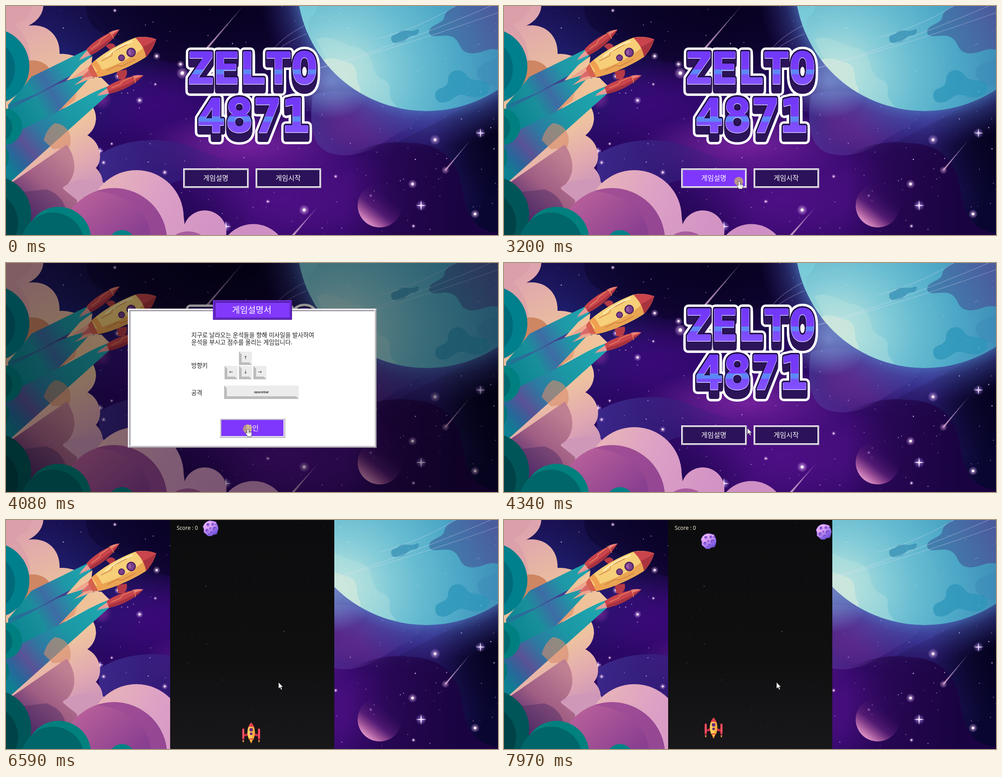
These frames come from a looping animation (1094x512 px, 8000 ms). An HTML page:

```html
<!DOCTYPE html>
<html lang="ko">
<head>
<meta charset="utf-8">
<title>ZELTO 4871</title>
<style>
html, body { margin: 0; width: 100%; height: 100%; overflow: hidden; background: #14043a; }
svg { display: block; width: 100vw; height: 100vh; }
.ko { font-family: 'Noto Sans CJK KR', 'Noto Sans CJK', sans-serif; }
.logo { font-family: 'DejaVu Sans Mono', monospace; font-weight: 700; text-anchor: middle; stroke-linejoin: round; }
.mid { text-anchor: middle; }
</style>
</head>
<body>
<svg id="stage" viewBox="0 0 1094 512" preserveAspectRatio="none"></svg>
<script>
const LOOP = 8000;
let defs = '', ids = 0, seed = 11;
const rnd = () => (seed = (seed * 16807) % 2147483647) / 2147483647;

const rect = (x, y, w, h, fill, more = '') => `<rect x="${x}" y="${y}" width="${w}" height="${h}" fill="${fill}" ${more}/>`;
const circle = (x, y, r, fill, more = '') => `<circle cx="${x}" cy="${y}" r="${r}" fill="${fill}" ${more}/>`;
const path = (d, fill, more = '') => `<path d="${d}" fill="${fill}" ${more}/>`;
const label = (x, y, size, text, fill, cls = 'ko mid', more = '') =>
  `<text x="${x}" y="${y}" font-size="${size}" fill="${fill}" class="${cls}" ${more}>${text}</text>`;
const group = (inner, more = '') => `<g ${more}>${inner}</g>`;

// stops: "offset colour opacity" separated by commas
const stops = list => list.split(',').map(s => {
  const [o, c, a = 1] = s.trim().split(' ');
  return `<stop offset="${o}" stop-color="${c}" stop-opacity="${a}"/>`;
}).join('');
function linear(x1, y1, x2, y2, list) {
  const id = 'g' + ids++;
  defs += `<linearGradient id="${id}" gradientUnits="userSpaceOnUse" x1="${x1}" y1="${y1}" x2="${x2}" y2="${y2}">${stops(list)}</linearGradient>`;
  return `url(#${id})`;
}
function radial(x, y, r, list) {
  const id = 'g' + ids++;
  defs += `<radialGradient id="${id}" gradientUnits="userSpaceOnUse" cx="${x}" cy="${y}" r="${r}">${stops(list)}</radialGradient>`;
  return `url(#${id})`;
}
function glow(x, y, rx, ry, color, alpha) {
  const id = 'g' + ids++;
  defs += `<radialGradient id="${id}">${stops(`0 ${color} ${alpha}, .5 ${color} ${alpha * .6}, 1 ${color} 0`)}</radialGradient>`;
  return `<ellipse cx="${x}" cy="${y}" rx="${rx}" ry="${ry}" fill="url(#${id})"/>`;
}

function star(x, y, r) {
  return glow(x, y, r * 1.7, r * 1.7, '#d9a8ee', .75) + circle(x, y, r * .5, '#fff3f6');
}
function sparkle(x, y, r) {
  const k = r * .13;
  return glow(x, y, r, r, '#b48cf0', .7) +
    path(`M${x} ${y - r}L${x + k} ${y - k} ${x + r} ${y} ${x + k} ${y + k} ${x} ${y + r} ${x - k} ${y + k} ${x - r} ${y} ${x - k} ${y - k}Z`, '#f4e4ff');
}
function comet(x1, y1, x2, y2, w) {
  const a = Math.atan2(y2 - y1, x2 - x1), dx = Math.sin(a) * w, dy = Math.cos(a) * w;
  return path(`M${x1} ${y1}L${x2 + dx} ${y2 - dy}L${x2 - dx} ${y2 + dy}Z`,
    linear(x1, y1, x2, y2, '0 #b98fd0 .4, 1 #d8aed0 .85'));
}
function dust(n, x0, y0, w, h, color, alpha, size) {
  let s = '';
  for (let i = 0; i < n; i++)
    s += circle((x0 + rnd() * w).toFixed(1), (y0 + rnd() * h).toFixed(1), (.5 + rnd() * size).toFixed(2), color,
      `opacity="${(alpha * (.4 + .6 * rnd())).toFixed(2)}"`);
  return s;
}

function sky() {
  return rect(0, 0, 1094, 512, linear(0, 0, 0, 512, '0 #190a48, .45 #2a0864, 1 #2a0760')) +
    glow(130, 130, 230, 190, '#1d2270', .9) +
    glow(480, 10, 400, 190, '#06011c', .9) +
    path('M178 0C182 70 235 60 290 95S400 140 470 115S640 130 668 0Z', '#080222', 'opacity=".35"') +
    glow(330, 220, 170, 100, '#440a86', .6) +
    glow(540, 315, 240, 85, '#8f2bb0', .75) +
    glow(620, 430, 270, 140, '#5a1191', .8) +
    glow(760, 400, 200, 130, '#4a0f80', .55) +
    glow(400, 480, 160, 90, '#1d064c', .6) +
    path('M205 335C250 300 330 292 390 308C450 325 470 350 560 352C500 400 420 370 360 400L210 400Z',
      linear(200, 320, 540, 370, '0 #3c2a8c .95, .5 #37207f .7, 1 #3c1a80 0')) +
    path('M682 200C720 180 830 190 930 240L900 270C850 290 810 340 740 333C690 328 670 290 682 200Z',
      linear(690, 200, 860, 320, '0 #4a3a98 .75, 1 #5a2c90 .5')) +
    glow(800, 250, 110, 80, '#8a2a90', .65) +
    glow(935, 260, 220, 90, '#3a3a96', .7) +
    path('M1094 180V512C1040 500 1024 470 1015 410C1005 340 960 300 870 306C930 270 1010 240 1094 180Z',
      linear(930, 290, 1094, 330, '0 #271762 .7, .5 #17124e .9, 1 #090631 1')) +
    glow(1080, 280, 130, 160, '#03011a', .85) +
    path('M740 352C790 310 850 300 900 306C965 308 1004 340 1015 410C1024 470 1040 500 1094 508V512H740Z',
      linear(760, 420, 1010, 430, '0 #280750 0, .4 #24064c .8, 1 #190441 1')) +
    glow(212, 208, 24, 24, '#7a2a96', .8) +
    dust(230, 120, 0, 974, 512, '#e4c6f2', .9, .95) +
    [[297, 211, 5], [954, 299, 7], [904, 398, 6], [663, 456, 7], [1043, 465, 6], [335, 112, 5], [249, 157, 5],
     [353, 372, 4], [388, 130, 5], [242, 10, 3], [733, 381, 3], [217, 350, 3.5], [235, 308, 2.5], [582, 437, 3],
     [906, 492, 3], [811, 424, 2.5], [332, 175, 2.5], [392, 150, 8]].map(s => star(...s)).join('') +
    comet(529, -2, 444, 98, 2.4) + comet(1035, 297, 977, 367, 1.8) + glow(977, 367, 9, 9, '#e0a8e0', .6) +
    comet(695, 447, 637, 514, 2.4) +
    sparkle(1055, 284, 11) + sparkle(923, 446, 12) + sparkle(489, 493, 12) + sparkle(209, 324, 8);
}

function planets() {
  defs += '<clipPath id="disc"><circle cx="935" cy="-53" r="288"/></clipPath>';
  const surface = circle(935, -53, 288, radial(742, 152, 400,
      '0 #bfe4dd, .12 #a6dbdc, .28 #82cbd8, .45 #66bbd0, .65 #4ea9c8, .85 #4194bb, 1 #3f7fae')) +
    path('M650 0H692C690 25 670 20 672 45C674 75 660 70 650 60Z', '#7fd0dc', 'opacity=".65"') +
    path('M700 145C690 112 730 112 752 125C790 128 775 165 785 178C800 205 760 210 730 190Z', '#dfecdd', 'opacity=".7"') +
    path('M690 75C720 60 745 85 775 92C830 100 800 150 840 165C870 180 835 195 870 225L760 210Z', '#b9e2dd', 'opacity=".35"') +
    path('M857 76C853 62 870 66 874 58C882 50 900 60 912 53C922 48 920 66 906 66C892 66 892 80 878 81C868 84 858 84 857 76Z', '#368db4', 'opacity=".7"') +
    path('M941 60C938 40 975 42 975 22C982 2 1010 -6 1040 -2H1094V98C1070 92 1062 106 1035 106C1003 103 1015 78 990 68C970 62 945 75 941 60Z',
      linear(950, 70, 1080, 10, '0 #3d78a8 .85, .5 #456aa4 .9, 1 #4b5a9c .95')) +
    path('M955 203C950 178 985 190 983 163C986 140 1014 136 1026 158C1040 172 1072 160 1075 180C1076 205 1045 208 1022 200C1000 192 994 215 972 216C962 216 956 212 955 203Z', '#2c96ba', 'opacity=".75"') +
    path('M1050 140C1060 120 1094 126 1094 110V180C1070 180 1040 160 1050 140Z', '#3a86b4', 'opacity=".4"') +
    dust(70, 660, 0, 434, 220, '#d9f2f4', .5, .7);
  const trail = d => path(d, 'none', 'stroke="#e6dcf4" stroke-width="1.1" opacity=".4"');
  return circle(935, -53, 372, radial(935, -53, 372, '.76 #4f7cc6 .75, .84 #4454ac .45, 1 #3a2a90 0')) +
    glow(722, 168, 95, 85, '#7c92d2', .85) +
    group(surface, 'clip-path="url(#disc)"') +
    trail('M640 155Q860 95 1082 -2') + trail('M700 138Q890 88 1094 15') + trail('M664 44Q620 66 596 95') +
    trail('M668 62Q625 80 602 100') + trail('M830 72Q920 48 1000 0') +
    circle(831, 446, 49, linear(803, 484, 850, 425, '0 #d78cc2, .2 #a0549a, .48 #5a1f78 .8, 1 #3a0f63 .1'));
}

function beams() {
  const teal = linear(230, 110, 10, 240, '0 #20aab2, .4 #1e98a6, .6 #3d6ca4, .75 #1a8f9c, 1 #0a8590');
  const peach = linear(120, 230, 210, 150, '0 #e39a70, .4 #efc097, 1 #f0c69e');
  return path('M160 118L60 158 5 221 0 300 120 236 200 165Z', linear(180, 130, 20, 260, '0 #2c5a9e, .35 #433f8c, .6 #3a5c9c, 1 #157e92')) +
    path('M187 94L57 158 5 221 72 195 168 142 192 108Z', teal) +
    path('M182 150L112 176 0 236V302L36 276 120 234 196 164Z', teal) +
    path('M230 176L185 198 120 234 36 276 0 308V402L236 190Z',
      linear(232, 180, 10, 370, '0 #20aab2, .4 1b97a4, .4 #1b97a4, .62 #2c7aa2, .78 #5a5296, .9 #27679a, 1 #0f7f92'.replace('.4 1b97a4, ', ''))) +
    path('M134 167L165 132 192 112 188 150Z', peach) +
    path('M117 235L150 200 185 162 212 160 230 178 165 204Z', peach) +
    path('M117 235L158 192 152 212Z', '#e2916a', 'opacity=".6"');
}

function rocket() {
  const pod = (x, y, a) => group(
    path('M-43 -5L-68 0-43 6Z', '#f2a08c') + path('M-43 -2L-72 2-42 8Z', '#e89a9c', 'opacity=".85"') +
    path('M-43 -8C-20 -13 15 -12 43 0C15 12 -20 13 -43 8Z', '#c9444c') +
    path('M-43 2C-15 5 15 5 43 0C15 12 -20 13 -43 8Z', '#a6323f') +
    path('M-34 -2H-12L-6 -6H18M20 -9Q24 0 20 9', 'none', 'stroke="#f0a06a" stroke-width="1.2"') +
    path('M22 -8C30 -7 38 -3 43 0C36 0 28 -1 23 -1Z', '#e98276'),
    `transform="translate(${x} ${y}) rotate(${a})"`);
  const body = path('M-74 -14L-126 -8-84 1-126 9-70 14Z', '#f0a48e') + path('M-76 -8L-108 2-74 10Z', '#d96a6a') +
    path('M-82 -10Q-76 -15 -68 -17V17Q-76 15 -82 10Z', '#d7604f') +
    path('M-70 -17C-40 -26 5 -29 45 -24C64 -18 76 -8 83 0C76 8 64 18 45 25C5 29 -40 26 -70 17Z', '#f6cf78') +
    path('M-70 4C-20 13 20 12 50 4L45 25C5 29 -40 26 -70 17Z', '#e9a552') +
    path('M-70 -17Q-63 0 -70 17L-58 20Q-52 0 -58 -20Z', '#f0a050') +
    path('M43 -24C64 -18 76 -8 83 0C76 8 64 18 45 25Q52 0 43 -24Z', '#c9444c') +
    path('M49 2Q66 3 83 0C76 8 64 18 45 25Q49 12 49 2Z', '#a9343f') +
    path('M-48 -12H-22L-16 -19H20M-46 13H-20L-12 19H22', 'none', 'stroke="#c9703c" stroke-width="1.2"') +
    path('M-36 -16Q0 -25 34 -20', 'none', 'stroke="#fff0b8" stroke-width="3"') +
    circle(20, 1, 10.5, '#4a1f62') + circle(20, 1, 8, '#7a3f8c') + circle(-4.5, 2, 7.5, '#4a1f62') + circle(-4.5, 2, 5.5, '#7a3f8c') +
    path('M14 2A6 6 0 0 1 22 -5L18 6Z', '#9a5aa4');
  return path('M222 90Q232 78 243 88L238 104Z', '#b53a45') + path('M246 146L268 142Q272 154 262 164H250Z', '#b53a45') +
    pod(218, 78, -36.5) + group(body, 'transform="translate(260 112) rotate(-27)"') + pod(266, 172, -23);
}

function clouds() {
  const peach = linear(20, 40, 190, 400, '0 #dfa5ae, .3 #e9bba0, .62 #f0c79d, .85 #e2aab0, 1 #cf98b8');
  const pink = linear(220, 370, 520, 512, '0 #e8b4b8, .4 #dc9fc6, 1 #cf8fc4');
  const upper = path('M0 0H83C82 18 70 34 50 44C95 38 121 70 119 107C175 105 212 150 211 185C206 200 198 215 190 222C205 240 204 272 181 289C212 305 216 345 200 362Q214 376 215 393L260 440 150 470 0 430Z', peach) +
    path('M0 0H58C55 24 36 32 20 42C50 70 60 110 52 150L0 200Z', '#d79aa8', 'opacity=".5"') +
    path('M50 122C80 118 98 135 102 152L40 186Z', '#cf8663');
  return upper + beams() +
    path('M108 262C140 264 150 295 140 318L104 320L84 300Q90 275 108 262Z', '#d98d6c', 'opacity=".6"') +
    circle(-33, 135, 85, '#007f8c') + circle(-48, 140, 68, '#006a7a') +
    circle(-5, 270, 41, '#007f80') + circle(-20, 272, 34, '#006a70') + circle(-32, 338, 39, '#00757a') +
    path('M8 398L135 310C160 345 158 385 126 408L158 434V512H0V405Z', linear(140, 340, 20, 480, '0 #c08092, .45 #a05e84, .8 #5f3470, 1 #402060')) +
    path('M126 406Q150 385 195 388L215 394 158 434Q146 412 126 406Z', '#cf98b8') +
    circle(290, 472, 105, pink) + path('M200 420L395 470 400 512H200Z', pink) +
    circle(442, 505, 48, pink) + circle(550, 563, 75.5, pink) +
    circle(240, 525, 118, linear(200, 407, 290, 512, '0 #b55d9a, 1 #8a4090')) +
    path('M200 414A118 118 0 0 1 356 512H322C318 460 270 420 200 414Z', '#9c4a94', 'opacity=".7"') +
    circle(405, 560, 56, '#a85a9e') +
    path('M0 512V420L90 410Q150 430 130 512Z', '#4c2a62', 'opacity=".45"') +
    circle(-30, 466, 86, '#005558') + circle(-45, 485, 72, '#004347') +
    circle(117, 521, 72, '#00807e') + circle(104, 532, 70, '#00666a') + circle(258, 531, 30, '#008286');
}

function logo() {
  const lines = [['ZELTO', 548, 173, 96, 103], ['4871', 550, 281, 104, 205]];
  const word = ([text, x, y, size], dy, fill, stroke, w) =>
    label(x, y + dy, size, text, fill, 'logo', `stroke="${stroke}" stroke-width="${w}"`);
  let s = '';
  for (const [color, w] of [['#ffffff', 20], ['#2c1458', 9]])
    for (const l of lines)
      for (let dy = 18; dy >= 0; dy -= 3) s += word(l, dy, color, color, w);
  for (const l of lines) {
    const [, , y, , top] = l;
    const face = linear(0, top, 0, y, '0 #7038f8, .55 #7a3cf8, .55 #5a8cf4, .7 #5f83fa, .72 #7a4bfa, 1 #8450ff');
    s += word(l, 0, '#1f0c48', '#1f0c48', 9) + word(l, 1, '#c9bcff', '#c9bcff', 4) + word(l, 0, face, face, 2.5);
  }
  return s;
}

function bevel(x, y, w, h, b, a, c) {
  return path(`M${x} ${y}h${w}l${-b} ${b}H${x + b}V${y + h - b}L${x} ${y + h}Z`, a) +
    path(`M${x + w} ${y + h}V${y}l${-b} ${b}V${y + h - b}H${x + b}L${x} ${y + h}Z`, c);
}
const ridge = (x, y, w, h, b, a, c) => bevel(x, y, w, h, b, a, c) + bevel(x + b, y + b, w - 2 * b, h - 2 * b, b, c, a);
const button = (id, x, y, text, size) =>
  rect(x, y, 146, 44, '#2c1259', `id="${id}"`) + ridge(x, y, 146, 44, 2, '#f3f0f8', '#b6b1bc') +
  label(x + 72.5, y + 22 + size * .36, size, text, '#fff');

function key(x, y, w, text, size) {
  return rect(x, y, w, 30, '#ececec') +
    path(`M${x} ${y}l6 6v18h${w - 12}l6 6H${x}Z`, '#bcbcbc') +
    label(x + w / 2, y + 17, size, text, '#222', 'mid', 'font-family="Roboto, \'DejaVu Sans\', sans-serif" font-weight="500"');
}
function modal() {
  const ink = '#1c1c1c', text = (y, s) => label(412, y, 13.2, s, ink, 'ko');
  return rect(0, 0, 1094, 512, '#000', 'opacity=".42"') +
    rect(271, 102, 553, 311, '#fff') + ridge(271, 102, 553, 311, 3, '#f1eff2', '#aaa5ac') +
    rect(460, 83, 176, 44, '#8239fc') + ridge(460, 83, 176, 44, 3, '#6c2bd6', '#5620a8') +
    label(546.5, 112, 19.1, '게임설명서', '#fff') +
    text(166, '지구로 날라오는 운석들을 향해 미사일을 발사하여') +
    text(182, '운석을 부시고 점수를 올리는 게임입니다.') +
    text(234, '방향키') + text(295, '공격') +
    key(518, 198, 29, '↑', 10) + key(486, 230, 29, '←', 10) + key(518, 230, 29, '↓', 10) + key(550, 230, 29, '→', 10) +
    key(485, 274, 166, 'spacebar', 8) + button('ok', 475, 347, '확인', 15.6);
}

function ship() {
  const pod = x => rect(x - 2.5, -10, 5, 24, '#e23a4e', 'rx="2.5"') + rect(x - 2, 14, 4, 3, '#8a2440') +
    path(`M${x - 2} 17h4l-2 5Z`, '#ffb03c') + rect(x - .5, -8, 1.2, 18, '#ff7a80');
  return path('M-18 4L0 -2 18 4V8L0 6-18 8Z', '#c92c48') + pod(-17.5) + pod(17.5) +
    path('M-5 13H5L0 24Z', '#ff9a34') + path('M-2.5 13H2.5L0 19Z', '#ffe27a') +
    path('M0 -23C7 -16 9 -6 8 3Q7 10 5 15H-5Q-7 10 -8 3C-9 -6 -7 -16 0 -23Z', '#ffcf5a') +
    path('M0 -23C7 -16 9 -6 8 3Q7 10 5 15H1Q5 -4 0 -23Z', '#f5ac3c') +
    path('M0 -23Q5 -18 7 -12Q0 -16 -7 -12Q-5 -18 0 -23Z', '#e23a4e') +
    circle(0, -7, 4, '#6a2a7c') + circle(0, 2, 3, '#6a2a7c') + rect(-5, 12, 10, 3, '#e0523c');
}
function meteor() {
  const pit = (x, y, r) => circle(x, y, r, '#6a48c4') + circle(x + .8, y + .9, r * .68, '#9a68e0');
  return path('M-8 -15L-2 -17 5 -16 12 -14 15 -7 17 0 15 8 13 13 6 14 2 17 -6 17 -10 13 -15 9 -15 2 -17 -4 -13 -11Z',
    linear(-10, -14, 11, 14, '0 #f0b8fa, .4 #d79af4, .7 #9a72ec, 1 #6248d4'), 'stroke="#7a58d8" stroke-width="1"') +
    pit(-6, -8, 3.2) + pit(5, -9, 3) + pit(9, 1, 4) + pit(-8, 5, 3.4) + pit(2, 10, 3) + pit(-1, 0, 2) + pit(12, -9, 1.8) + pit(-4, 14, 1.7);
}
function game() {
  return rect(365, 0, 365, 512, linear(0, 0, 0, 512, '0 #0c0c0e, .6 #0f0f10, 1 #18171a')) +
    dust(32, 368, 4, 358, 470, '#8a8a92', .4, .5) + circle(445, 148, 1, '#777') + circle(618, 249, 1, '#777') +
    label(379.5, 22, 12, 'Score : 0', '#f6ecda', '', 'font-family="\'Noto Sans\', \'Open Sans\', sans-serif"') +
    group(meteor(), 'id="rockA"') + group(meteor(), 'id="rockB"') + group(ship(), 'id="ship"');
}

const stage = document.getElementById('stage');
const scene = sky() + planets() + clouds() + rocket() +
  group(logo() + button('guide', 394, 363, '게임설명', 15.2) + button('start', 555, 363, '게임시작', 15.2), 'id="menu"') +
  group(modal(), 'id="modal"') + group(game(), 'id="game"') +
  group(circle(-1, 0, 10, '#e0cf45', 'id="halo" opacity=".6"') +
    path('M0 0V14L3.4 11 5.8 16.5 8 15.5 5.6 10.3H9.8Z', '#fff', 'id="arrow" stroke="#222" stroke-width=".6"') +
    path('M-2 1Q0 -1 2 1V6Q8 6 8.5 9Q9 13 7 17H-1Q-3 13 -5.5 10Q-5 7.5 -2 9.5Z M2 6V10M5 7V10', '#fff', 'id="hand" stroke="#222" stroke-width=".8"'), 'id="pointer"');
stage.innerHTML = `<defs>${defs}</defs>${scene}`;
const $ = id => document.getElementById(id);

// rows of time, x, y
const POINTER = [[190, 1057, 484], [340, 1049, 474], [480, 1049, 474], [600, 1041, 466], [800, 1041, 466], [1430, 472, 397],
  [2180, 472, 397], [2400, 578, 406], [2460, 578, 404], [2660, 523, 392], [3680, 523, 392], [3880, 538, 371],
  [4280, 538, 371], [4820, 566, 354], [4890, 572, 355], [5090, 593, 371], [5770, 593, 371], [5980, 606, 363]];
const SHIP = [[6590, 545, 476], [6790, 556, 476], [6990, 556, 465], [7900, 466, 465]];

function along(track, t) {
  const i = track.findIndex(k => k[0] > t);
  if (i === 0) return track[0].slice(1);
  if (i < 0) return track[track.length - 1].slice(1);
  const [t0, x0, y0] = track[i - 1], [t1, x1, y1] = track[i], k = (t - t0) / (t1 - t0);
  return [x0 + (x1 - x0) * k, y0 + (y1 - y0) * k];
}
const show = (id, on) => $(id).setAttribute('display', on ? 'inline' : 'none');
const place = (id, x, y) => $(id).setAttribute('transform', `translate(${x.toFixed(1)} ${y.toFixed(1)})`);
const between = (t, a, b) => t >= a && t < b;

function draw(t) {
  const help = between(t, 3330, 4210), play = t >= 5510;
  const [x, y] = along(POINTER, t);
  const over = (bx, by) => between(x, bx, bx + 146) && between(y, by, by + 44);
  const hover = { guide: !help && !play && over(394, 363), start: !help && !play && over(555, 363), ok: help && over(475, 347) };
  let hand = false;
  for (const id in hover) {
    $(id).setAttribute('fill', hover[id] ? '#7f37fd' : '#2c1259');
    hand = hand || hover[id];
  }
  show('menu', !play);
  show('modal', help);
  show('game', play);
  show('pointer', t >= 190);
  show('hand', hand);
  show('arrow', !hand);
  show('halo', between(t, 3130, 3330) || between(t, 4080, 4210) || between(t, 5440, 5510));
  place('pointer', x, y);
  place('ship', ...along(SHIP, t));
  show('rockA', t >= 6590);
  show('rockB', t >= 7600);
  place('rockA', 455, 18.5 + (t - 6590) * .0207);
  place('rockB', 711, 18.5 + (t - 7600) * .0207);
}

const begin = performance.now();
function tick() {
  draw((performance.now() - begin) % LOOP);
  requestAnimationFrame(tick);
}
tick();
</script>
</body>
</html>
```
